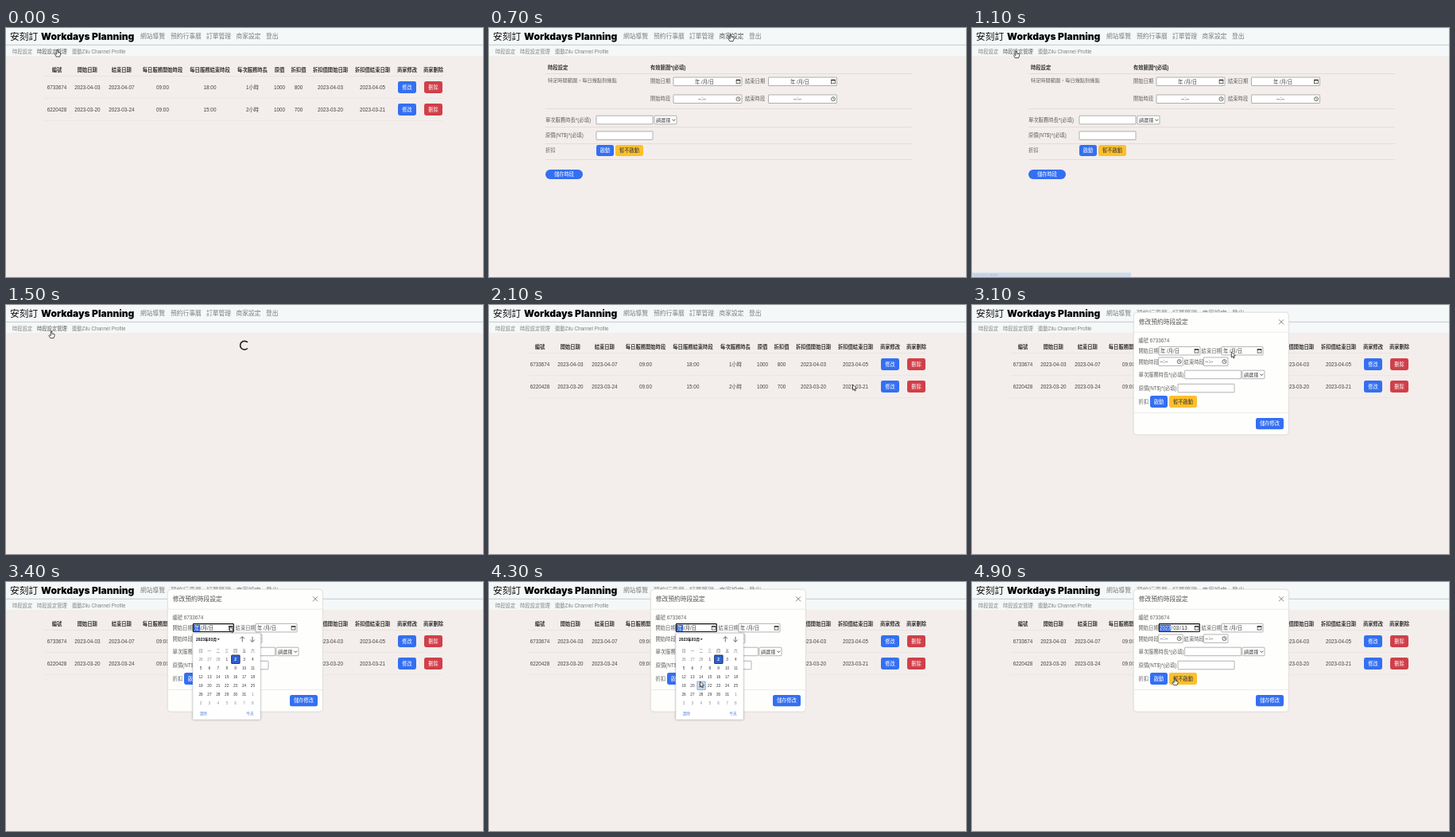
These frames come from a looping animation (600 by 313 pixels, 5000 ms). An HTML page with a canvas:

```html
<!DOCTYPE html>
<html>
<head>
<meta charset="utf-8">
<title>Schedule settings</title>
<style>
  html, body { margin: 0; width: 100%; height: 100%; overflow: hidden; background: #f3eeeb; }
  canvas { display: block; width: 600px; height: 313px; }
</style>
</head>
<body>
<canvas id="stage"></canvas>
<script>
const W = 600, H = 313, LOOP = 5000, STEP = 100;
const BLUE = '#346ff2', RED = '#d13f49', YELLOW = '#fdc02c', INK = '#333', GRAY = '#606060';
const SANS = '"Liberation Sans", "Noto Sans CJK TC", "Noto Sans CJK JP", sans-serif';

const canvas = document.getElementById('stage');
const ctx = canvas.getContext('2d');
const dpr = window.devicePixelRatio || 1;
canvas.width = W * dpr;
canvas.height = H * dpr;

// Pointer path: time, x, y of the tip
const PATH = [
  [0, 64.5, 27.5], [100, 64.5, 27.5], [500, 304, 8], [700, 304, 8],
  [1000, 56, 29], [1100, 55.5, 29], [1400, 56.5, 31], [1500, 57, 33],
  [1800, 174, 49], [2000, 380, 100], [2200, 535, 100], [2400, 505.5, 74.5],
  [2700, 505.5, 74.5], [3200, 281.5, 55], [3700, 281.5, 57], [3900, 280, 145],
  [4000, 272, 158], [4300, 265.5, 125], [4500, 265, 126], [4800, 255, 120], [4900, 255, 121]
];

const NAV = [['網站導覽', 169, 31], ['預約行事曆', 207, 38], ['訂單管理', 252, 31], ['商家設定', 289.5, 31], ['登出', 327, 15]];
const SUBNAV = [['時段設定', 8, 25], ['時段設定管理', 39, 38], ['連動Zilu Channel Profile', 83, 69]];
const COLS = [64, 102.3, 145.3, 197, 256.5, 310, 344, 368, 408, 461, 504.5, 537.5];
const HEADS = ['編號', '開始日期', '結束日期', '每日服務開始時段', '每日服務結束時段', '每次服務時長',
  '原價', '折扣價', '折扣價開始日期', '折扣價結束日期', '商家修改', '商家刪除'];
const ROWS = [
  ['6733674', '2023-04-03', '2023-04-07', '09:00', '18:00', '1小時', '1000', '800', '2023-04-03', '2023-04-05'],
  ['6220428', '2023-03-20', '2023-03-24', '09:00', '15:00', '2小時', '1000', '700', '2023-03-20', '2023-03-21']
];

let mouse = { x: 0, y: 0 };
const over = (x, y, w, h) => mouse.x >= x && mouse.x <= x + w && mouse.y >= y && mouse.y <= y + h;

function pointerAt(t) {
  let i = 0;
  while (i < PATH.length - 2 && PATH[i + 1][0] <= t) i++;
  const [t0, x0, y0] = PATH[i], [t1, x1, y1] = PATH[i + 1];
  const k = Math.min(1, (t - t0) / (t1 - t0));
  return { x: x0 + (x1 - x0) * k, y: y0 + (y1 - y0) * k };
}

// y is the vertical centre of the line
function text(s, x, y, { size = 6.3, color = GRAY, align = 'left', weight = 400, family = SANS } = {}) {
  ctx.font = `${weight} ${size}px ${family}`;
  ctx.textAlign = align;
  ctx.fillStyle = color;
  ctx.fillText(s, x, y + size * 0.37);
}

function rect(x, y, w, h, color) {
  ctx.fillStyle = color;
  ctx.fillRect(x, y, w, h);
}

function line(color, width, ...pts) {
  ctx.beginPath();
  pts.forEach(([x, y]) => ctx.lineTo(x, y));
  ctx.strokeStyle = color;
  ctx.lineWidth = width;
  ctx.stroke();
}

function box(x, y, w, h, r, fill, border, width = 0.6) {
  ctx.beginPath();
  ctx.roundRect(x, y, w, h, r);
  ctx.fillStyle = fill;
  ctx.fill();
  if (!border) return;
  ctx.strokeStyle = border;
  ctx.lineWidth = width;
  ctx.stroke();
}

function button(s, x, y, w, h, fill, color = '#fff', r = 2.4) {
  box(x, y, w, h, r, fill);
  text(s, x + w / 2, y + h / 2, { color, align: 'center' });
}

const field = (x, y, w, h = 10.5) => box(x, y, w, h, 0.6, '#fff', '#808080');

function select(x, y) {
  box(x, y, 28, 10.5, 1, '#fff', '#808080');
  text('請選擇', x + 2, y + 5.3, { size: 6.1, color: '#444' });
  line(INK, 0.9, [x + 22.6, y + 4.5], [x + 24.4, y + 6.3], [x + 26.2, y + 4.5]);
}

function calendarIcon(x, y) {
  ctx.strokeStyle = INK;
  ctx.lineWidth = 0.7;
  ctx.strokeRect(x - 2.4, y - 2, 4.8, 4.5);
  rect(x - 2.6, y - 2.4, 5.2, 1.5, INK);
}

function clockIcon(x, y) {
  ctx.beginPath();
  ctx.arc(x, y, 2.5, 0, Math.PI * 2);
  ctx.strokeStyle = INK;
  ctx.lineWidth = 0.7;
  ctx.stroke();
  line(INK, 0.6, [x, y - 1.6], [x, y + 0.1], [x + 1.2, y + 0.8]);
}

function dateField(x, y, w, tx) {
  field(x, y, w);
  text('年 /月/日', tx, y + 5.2, { color: '#444' });
  calendarIcon(x + w - 4.5, y + 5.2);
}

function timeField(x, y, w, tx) {
  field(x, y, w);
  text('--:--', tx, y + 5, { color: INK });
  clockIcon(x + w - 4.5, y + 5.2);
}

function header(modal) {
  rect(0, 0, W, 35, '#f5f8f8');
  rect(0, 20.8, W, 1, '#c3cacd');
  text('安刻訂', 5, 10.7, { size: 11.7, color: '#111' });
  text('Workdays Planning', 44, 10.8, { size: 12, color: '#000', weight: 900, family: 'Inter, sans-serif' });
  for (const [s, x, w] of NAV) {
    text(s, x, 10.3, { size: 7.75, color: !modal && over(x, 4, w, 13) ? '#555' : '#7c7e7e' });
  }
  for (const [s, x, w] of SUBNAV) {
    text(s, x, 29.6, { color: !modal && over(x, 23, w, 12) ? '#555' : '#808282' });
  }
}

function listPage(modal) {
  HEADS.forEach((s, i) => text(s, COLS[i], 52.4, { color: INK, align: 'center', weight: 700 }));
  rect(48, 60, 501, 0.6, '#e3dedb');
  ROWS.forEach((row, r) => {
    const top = 67 + r * 28;
    row.forEach((s, i) => text(s, COLS[i], top + 7.3, { color: '#444', align: 'center' }));
    const hit = x => !modal && over(x, top, 23, 15);
    button('修改', 493, top, 23, 15, hit(493) ? '#2b5ed0' : BLUE);
    button('刪除', 526, top, 23, 15, hit(526) ? '#b5343e' : RED);
    rect(48, top + 21, 501, 0.6, '#e6e1de');
  });
}

function formPage() {
  const bold = { color: INK, weight: 700 };
  text('時段設定', 74, 50, bold);
  text('有效範圍*(必填)', 203, 50, bold);
  for (const y of [57, 101, 124, 145, 165]) rect(71, y, 461, 0.7, '#dbd6d3');
  text('特定時間範圍，每日幾點到幾點', 74, 66, { size: 6.2 });
  text('開始日期', 203, 66.5);
  dateField(232, 62, 86, 259);
  text('結束日期', 322, 66.5);
  dateField(351.5, 62, 86, 379);
  text('開始時段', 203, 89);
  timeField(232, 84, 86, 263);
  text('結束時段', 322, 89);
  timeField(351.5, 84, 86, 383);
  text('單次服務時長*(必填)', 71, 115.5);
  field(135, 110.3, 71);
  select(208, 110.3);
  text('原價(NT$)*(必填)', 71, 135);
  field(135, 130, 71);
  text('折扣', 71, 153.7);
  button('啟動', 135, 147, 22, 14, BLUE);
  button('暫不啟動', 159, 147, 35, 14, YELLOW, INK);
  button('儲存時段', 71, 178, 47, 12, BLUE, '#fff', 6);
}

function spinner(t) {
  const turn = (t - 1500) / 750 * Math.PI * 2;
  ctx.beginPath();
  ctx.arc(300, 50.7, 5.4, turn + Math.PI / 4, turn + Math.PI * 1.75);
  ctx.strokeStyle = '#222';
  ctx.lineWidth = 1.7;
  ctx.stroke();
}

function statusBar() {
  rect(0, 307.5, 200, 5.5, '#d0dbea');
  text('127.0.0.1:3000/…', 2, 310.5, { size: 4.4, color: '#a3b2c8' });
}

function startDate(picked) {
  box(235.3, 52.7, 51, 9.8, 0.8, '#fff', '#111', 1.2);
  const y = 57.6, white = { color: '#fff' }, dark = { color: INK };
  if (picked) {
    rect(236, 53.8, 14, 7.8, '#2c62d8');
    text('2023', 236, y, white);
    [['/', 250.4], ['03', 253.2], ['/', 261.1], ['13', 263.7]].forEach(([s, x]) => text(s, x, y, dark));
  } else {
    rect(236, 53.8, 8.2, 7.8, '#2c62d8');
    text('年', 237, y, white);
    text('/月/日', 245, y, dark);
  }
  calendarIcon(282.6, y);
}

function modalBox(focused, picked) {
  ctx.save();
  ctx.shadowColor = 'rgba(0,0,0,.08)';
  ctx.shadowBlur = 2 * dpr;
  box(203.3, 9.3, 195, 153.7, 4, '#fefefd');
  ctx.restore();
  box(203.3, 9.3, 195, 153.7, 4, '#fefefd', '#d3cfcd', 0.6);
  text('修改預約時段設定', 209.7, 21.3, { size: 7.75, color: '#555' });
  line('#777', 0.9, [386, 18.3], [392, 24.3]);
  line('#777', 0.9, [392, 18.3], [386, 24.3]);
  rect(203.6, 33.8, 194.4, 0.7, '#e4e4e4');
  rect(203.6, 135, 194.4, 0.7, '#e4e4e4');

  text('編號 6733674', 209.5, 45);
  text('開始日期', 209.5, 57.7);
  if (focused) startDate(picked);
  else dateField(235, 52.4, 52, 237);
  text('結束日期', 288.6, 57.7);
  dateField(314, 52.4, 52, 316);
  text('開始時段', 209.5, 71.2);
  timeField(234.7, 65.9, 30.5, 236.5);
  text('結束時段', 266.6, 71.2);
  timeField(291.4, 65.9, 30.5, 293.2);
  text('單次服務時長*(必填)', 209.5, 87.4);
  field(267.6, 82.2, 71);
  select(340, 82.2);
  text('原價(NT$)*(必填)', 209.5, 104.5);
  field(259, 99.3, 71);
  text('折扣', 209.5, 121.2);
  button('啟動', 224, 114, 22, 15, BLUE);
  button('暫不啟動', 248, 114, 35, 15, YELLOW, INK);
  button('儲存修改', 357, 142, 35, 14.3, BLUE);
}

function picker() {
  const left = 245, top = 97, dx = 10.9, dy = 11, size = 4.7;
  ctx.save();
  ctx.shadowColor = 'rgba(0,0,0,.28)';
  ctx.shadowBlur = 3 * dpr;
  rect(235, 64.3, 85, 108.7, '#fff');
  ctx.restore();
  ctx.strokeStyle = '#c8c8c8';
  ctx.lineWidth = 0.5;
  ctx.strokeRect(235, 64.3, 85, 108.7);

  text('2023年03月', 239, 72, { size: 4.9, color: '#111', weight: 700 });
  ctx.beginPath();
  ctx.moveTo(265.6, 71.2);
  ctx.lineTo(268.8, 71.2);
  ctx.lineTo(267.2, 73);
  ctx.fillStyle = '#222';
  ctx.fill();
  for (const [x, d] of [[297.3, -1], [310, 1]]) {
    line('#444', 0.8, [x, 72 - 3.3 * d], [x, 72 + 3.3 * d]);
    line('#444', 0.8, [x - 2.8, 72 + 0.6 * d], [x, 72 + 3.4 * d], [x + 2.8, 72 + 0.6 * d]);
  }

  [...'日一二三四五六'].forEach((s, i) =>
    text(s, left + i * dx, 85.8, { size, color: '#555', align: 'center' }));

  const hoverCol = Math.round((mouse.x - left) / dx), hoverRow = Math.round((mouse.y - top) / dy);
  for (let i = 0; i < 42; i++) {
    const col = i % 7, row = Math.floor(i / 7);
    const x = left + col * dx, y = top + row * dy;
    const day = i < 3 ? 26 + i : i < 34 ? i - 2 : i - 33;
    const today = i === 4;
    let color = i < 3 || i > 33 ? '#8c8c8c' : INK;
    if (today) {
      box(x - 5, y - 5, 10.5, 10.5, 0.5, '#2f62cf', '#1a2c55', 0.9);
      color = '#fff';
    } else if (col === hoverCol && row === hoverRow) {
      box(x - 5, y - 5, 10.5, 10.5, 0.5, '#c6d8f6', '#7387ad', 0.6);
    }
    text(day, x, y, { size, color, align: 'center', weight: today ? 700 : 400 });
  }
  text('清除', 248.2, 165, { size, color: '#4a7ade', align: 'center' });
  text('今天', 307, 165, { size, color: '#4a7ade', align: 'center' });
}

function pointer(hand) {
  const shape = hand
    ? [[-0.7, 0], [0.7, 0], [0.9, 3], [3.9, 3.7], [4.1, 5.8], [3, 8.6], [-1.2, 8.6], [-3.1, 5.4], [-2.3, 4.6], [-0.8, 5.6]]
    : [[0, 0], [0, 7], [1.6, 5.5], [2.7, 8], [3.8, 7.5], [2.8, 5.1], [5, 5]];
  ctx.beginPath();
  shape.forEach(([x, y]) => ctx.lineTo(mouse.x + x, mouse.y + y));
  ctx.closePath();
  ctx.lineJoin = 'round';
  ctx.fillStyle = '#fff';
  ctx.fill();
  ctx.strokeStyle = '#222';
  ctx.lineWidth = 0.8;
  ctx.stroke();
  if (hand) line('#444', 0.4, [mouse.x + 1, mouse.y + 5.2], [mouse.x + 1, mouse.y + 3.4]);
  ctx.lineJoin = 'miter';
}

function draw(t) {
  const page = t < 700 ? 'list' : t < 1400 ? 'form' : t < 1700 ? 'wait' : 'list';
  const modal = t >= 2500, open = t >= 3300 && t < 4900, picked = t >= 4900;
  mouse = pointerAt(t);

  ctx.setTransform(dpr, 0, 0, dpr, 0, 0);
  rect(0, 0, W, H, '#f3eeeb');
  header(modal);
  if (page === 'list') listPage(modal);
  else if (page === 'form') formPage();
  else spinner(t);
  if ((t >= 300 && t < 700) || (t >= 900 && t < 1400)) statusBar();
  if (modal) modalBox(open || picked, picked);
  if (open) picker();

  const onLink = NAV.some(([, x, w]) => over(x, 4, w, 13)) || SUBNAV.some(([, x, w]) => over(x, 23, w, 12));
  const onRow = page === 'list' && [67, 95].some(y => over(493, y, 23, 15) || over(526, y, 23, 15));
  pointer(modal ? picked : onLink || onRow);
}

const start = performance.now();
function tick() {
  const t = (performance.now() - start) % LOOP;
  draw(Math.floor(t / STEP) * STEP);
  requestAnimationFrame(tick);
}
tick();
</script>
</body>
</html>
```
